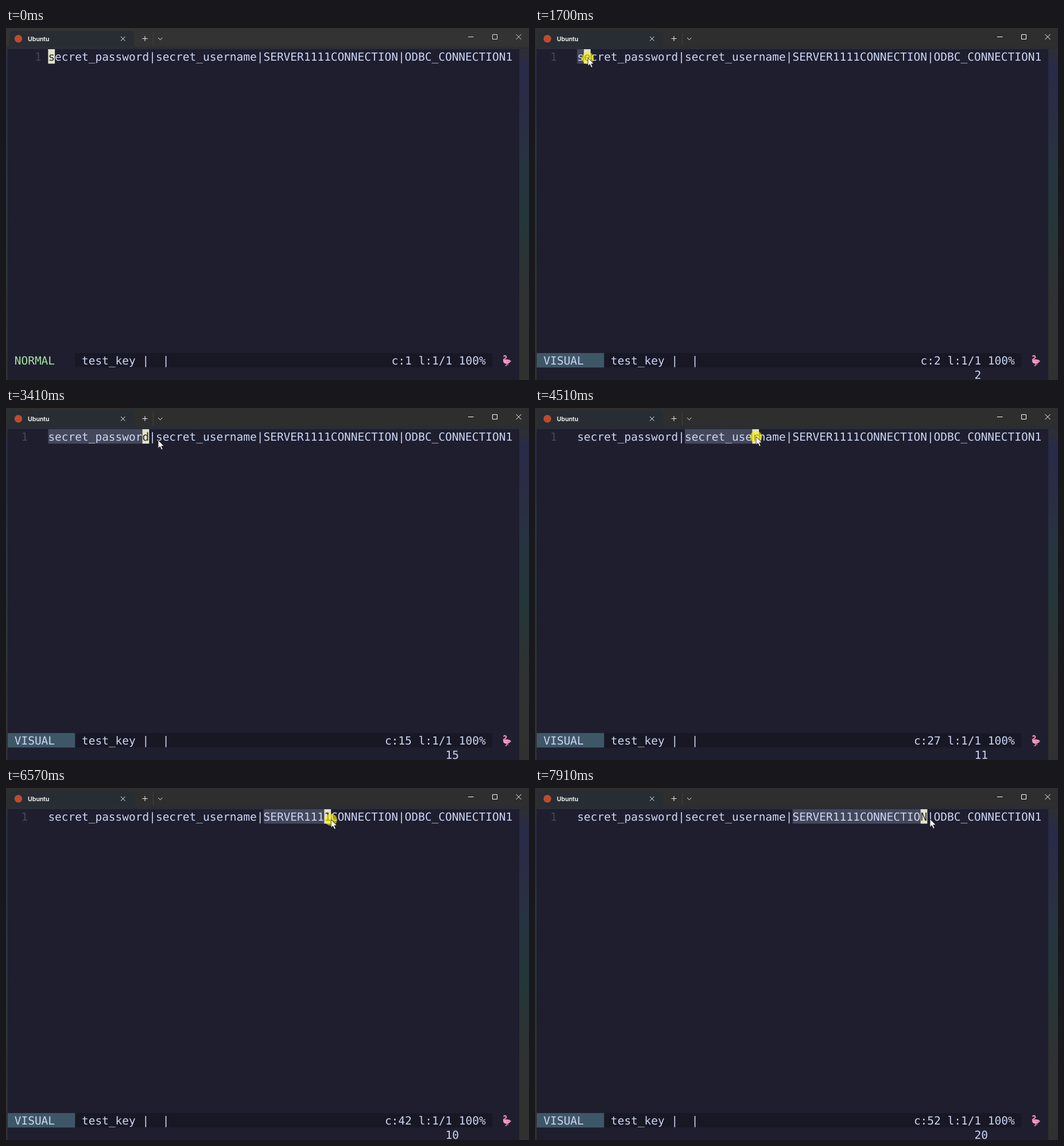
An HTML page for the animation above (8 s loop, 911 by 614 pixels).

```html
<!DOCTYPE html>
<html lang="en">
<head>
<meta charset="utf-8">
<title>Terminal selection</title>
<style>
  html, body { margin: 0; width: 100%; height: 100%; overflow: hidden; background: #2f2f2f; }
  svg { display: block; width: 100vw; height: 100vh; }
  .mono { font: 19.48px "DejaVu Sans Mono", monospace; fill: #cdd6f4; white-space: pre; text-rendering: geometricPrecision; }
  .tab { font: 600 10.6px Inter, sans-serif; fill: #fff; }
  .icon { fill: none; stroke: #f4f4f4; stroke-width: 1; }
</style>
</head>
<body>
<svg viewBox="0 0 911 614">
  <defs>
    <linearGradient id="edge" x1="0" y1="0" x2="0" y2="1">
      <stop offset=".06" stop-color="#2f2f33"/>
      <stop offset=".11" stop-color="#282b47"/>
      <stop offset=".23" stop-color="#2a2c45"/>
      <stop offset=".4" stop-color="#263440"/>
      <stop offset=".56" stop-color="#253638"/>
      <stop offset=".76" stop-color="#2f3132"/>
      <stop offset="1" stop-color="#303030"/>
    </linearGradient>
    <linearGradient id="seam" x1="0" y1="0" x2="0" y2="1">
      <stop offset="0" stop-color="#262c33" stop-opacity="0"/>
      <stop offset="1" stop-color="#282c3a"/>
    </linearGradient>
  </defs>

  <rect width="911" height="614" fill="url(#edge)"/>
  <rect id="title" width="911" height="34"/>
  <rect y="30" width="911" height="7" fill="url(#seam)"/>
  <path d="M2 33q4 0 4-4V12q0-7 7-7H216q7 0 7 7V29q0 4 4 4Z" fill="#272d33"/>
  <circle cx="21.5" cy="18.7" r="6.8" fill="#c04a2c"/>
  <text class="tab" x="38" y="23.4">Ubuntu</text>
  <path d="M256.5 8V30" stroke="#434343"/>
  <path class="icon" d="M200 15l7.5 7.5M207.5 15l-7.5 7.5M237.5 18.5h9M242 14v9M265 17l3.7 3.7 3.7-3.7"/>
  <path id="controls" class="icon" d="M805 15.5h9.5M847.5 11.5h8v8h-8ZM888.5 11l9 9M897.5 11l-9 9"/>

  <rect x="3" y="37" width="891" height="577" fill="#1e1e2e"/>
  <rect id="selection" y="37" height="25.2" fill="#45475a"/>
  <text id="number" class="mono" y="57" style="fill:#45475a">1</text>
  <text id="line" class="mono" y="57"></text>
  <rect id="block" y="37" width="11.73" height="25.2" fill="#e4e2cb"/>
  <text id="under" class="mono" y="57" style="fill:#2a2a2c"></text>

  <rect x="120.3" y="567" width="727" height="25.2" fill="#181825"/>
  <rect id="modeBox" x="3" y="567" width="117.3" height="25.2" fill="#3e5767"/>
  <text id="mode" class="mono" y="587"></text>
  <text id="file" class="mono" y="587">test_key |  |</text>
  <text id="ruler" class="mono" y="587"></text>
  <text id="count" class="mono" y="612"></text>

  <g fill="none" stroke="#f08db8" stroke-linecap="round">
    <path d="M871.5 584v5M873.5 584l1 3-3 0M869.5 589h3" stroke-width="1.1"/>
    <path d="M867.5 581C864 577 873 577 871.2 573.2 870 571 867.5 571.5 867 573" stroke-width="2.2"/>
    <path d="M866 581.5q2-4 6-3.5 5 0 8 3-3 4-8 4.5-5 .3-6-4Z" fill="#f59cc4" stroke="none"/>
    <path d="M866.5 573.5l-1.3 2.4" stroke="#3a2733" stroke-width="1.6"/>
    <path d="M871 581q4 1.5 8 0" stroke="#d9659a" stroke-width="1"/>
  </g>

  <circle id="press" r="10.5" fill="#fff200"/>
  <path id="pointer" d="M0 0V14.3L3.3 11.2 5.7 16.8 8.1 15.8 5.7 10.4H10.2Z"
        fill="#fff" stroke="#111" stroke-width=".8" stroke-linejoin="round"/>
</svg>

<script>
const LOOP = 8000, CELL = 11.73, LEFT = 3, FOCUS_AT = 1500, SHOW_AT = 280;
const LINE = "secret_password|secret_username|SERVER1111CONNECTION|ODBC_CONNECTION1";
const colX = col => LEFT + col * CELL;
const TEXT_X = colX(6);

// time, x, y of the pointer tip
const PATH = [
  [280, 848, 564], [910, 113, 64], [990, 98.5, 60], [1090, 98.5, 60], [1320, 78, 51],
  [1600, 78, 51], [2110, 232, 62], [2280, 241, 62], [2390, 244, 62], [2860, 244, 62],
  [3410, 265, 56], [3780, 265, 56], [4460, 376.5, 51], [4510, 385, 50], [5010, 430, 55.5],
  [5300, 430, 55.5], [5930, 455, 55], [6160, 455, 55], [6570, 566, 55], [6880, 625.5, 54],
  [7360, 675, 50], [7610, 675, 50], [7700, 686, 52], [7900, 686, 52], [7910, 688, 54]
];
const DRAGS = [
  { down: 1500, up: 2800 },
  { down: 3660, up: 5250 },
  { down: 6080, up: 7610 }
];
const FADE = 200, LAG = 20;

const el = {};
document.querySelectorAll("svg [id]").forEach(e => el[e.id] = e);
const set = (e, attrs) => { for (const k in attrs) e.setAttribute(k, attrs[k]); };

const slope = (i, k) => (PATH[i + 1][k] - PATH[i][k]) / (PATH[i + 1][0] - PATH[i][0]);

// Harmonic mean keeps the curve from overshooting its points.
function tangent(i, k) {
  if (i === 0 || i === PATH.length - 1) return 0;
  const a = slope(i - 1, k), b = slope(i, k);
  return a * b > 0 ? 2 * a * b / (a + b) : 0;
}

function along(t, k) {
  const last = PATH.length - 1;
  if (t <= PATH[0][0]) return PATH[0][k];
  if (t >= PATH[last][0]) return PATH[last][k];
  const i = PATH.findIndex(p => p[0] > t) - 1;
  const h = PATH[i + 1][0] - PATH[i][0], u = (t - PATH[i][0]) / h, v = 1 - u;
  return (1 + 2 * u) * v * v * PATH[i][k] + u * v * v * h * tangent(i, k)
    + u * u * (3 - 2 * u) * PATH[i + 1][k] - u * u * v * h * tangent(i + 1, k);
}

const columnAt = t => Math.floor((along(t, 1) - TEXT_X) / CELL);

function draw(t) {
  const drag = DRAGS.filter(d => t >= d.down).pop();
  const anchor = drag ? columnAt(drag.down) : 0;
  const head = drag ? columnAt(Math.max(drag.down, Math.min(t, drag.up) - LAG)) : 0;
  const visual = head !== anchor;
  const focused = t >= FOCUS_AT;

  set(el.title, { fill: focused ? "#2e2e2e" : "#333333" });
  el.controls.style.stroke = focused ? "#ffffff" : "#dcdcdc";
  set(el.number, { x: colX(focused ? 2 : 4) });

  const headX = TEXT_X + head * CELL, anchorX = TEXT_X + anchor * CELL;
  set(el.selection, { x: anchorX, width: visual ? headX - anchorX : 0 });
  set(el.block, { x: headX });
  set(el.under, { x: headX });
  el.under.textContent = LINE[head];

  el.modeBox.style.opacity = visual ? 1 : 0;
  el.mode.textContent = visual ? "VISUAL" : "NORMAL";
  el.mode.style.fill = visual ? "#cdd6f4" : "#a6e3a1";
  const ruler = `c:${head + 1} l:1/1 100%`;
  el.ruler.textContent = ruler;
  set(el.ruler, { x: colX(71 - ruler.length) });
  el.count.textContent = visual ? head - anchor + 1 : "";

  const x = along(t, 1), y = along(t, 2);
  const glow = drag ? Math.max(0, Math.min(1, 1 - (t - drag.up) / FADE)) : 0;
  set(el.press, { cx: x, cy: y + .5, opacity: .62 * glow });
  set(el.pointer, { transform: `translate(${x} ${y})`, opacity: t >= SHOW_AT ? 1 : 0 });
}

el.line.textContent = LINE;
set(el.line, { x: TEXT_X });
set(el.mode, { x: colX(1) });
set(el.file, { x: colX(11) });
set(el.count, { x: colX(65) });

const start = performance.now();
function tick() {
  draw((performance.now() - start) % LOOP);
  requestAnimationFrame(tick);
}
tick();
</script>
</body>
</html>
```
